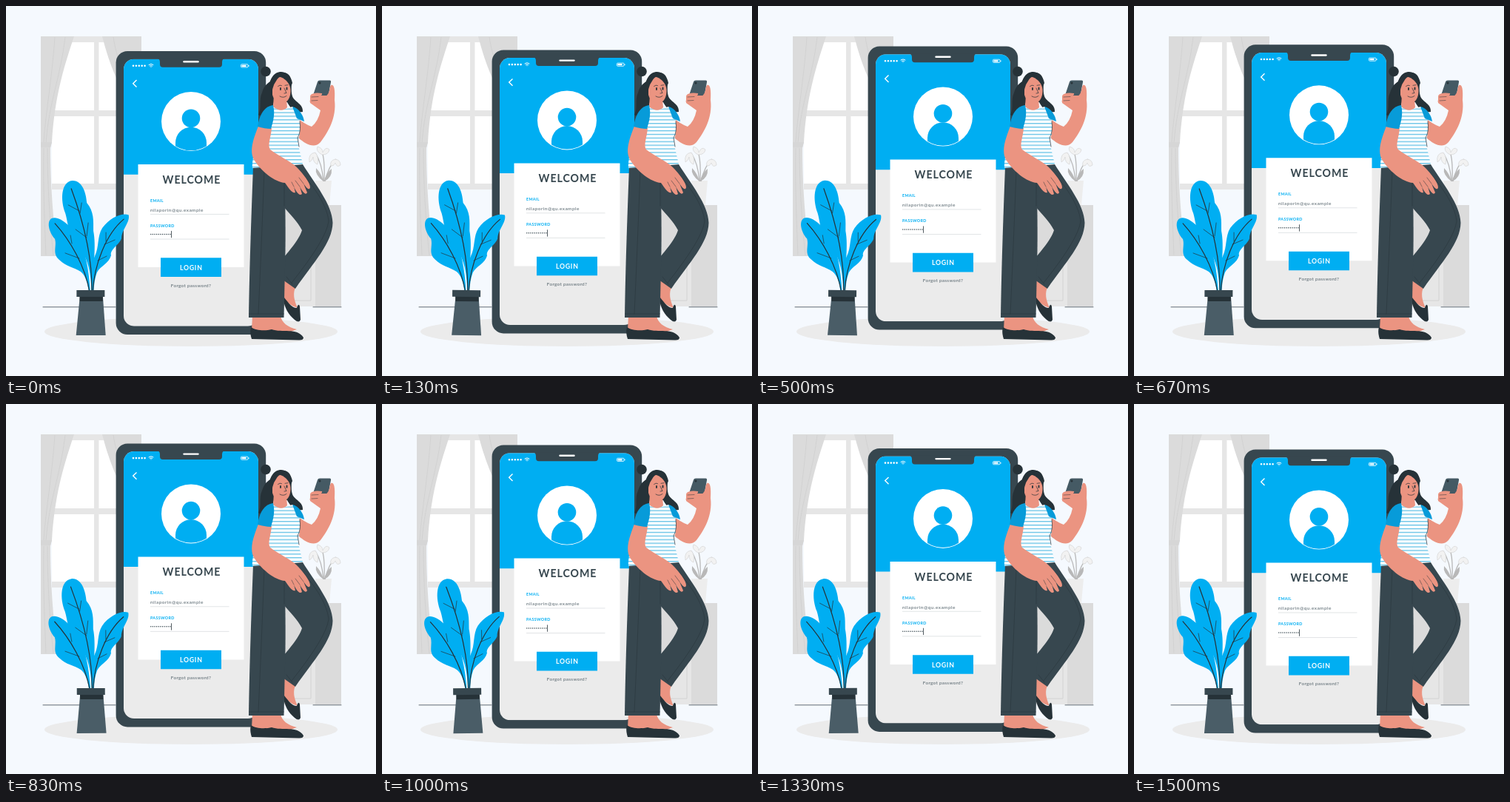
An HTML page for the animation above (1.54 s loop, 500 by 500 pixels).

```html
<!DOCTYPE html>
<html lang="en">
<head>
<meta charset="utf-8">
<title>Login illustration</title>
<style>
  html, body { margin: 0; width: 100%; height: 100%; overflow: hidden; background: #f5f9fe; }
  svg { display: block; width: 100vw; height: 100vh; }
  text { font-family: Lato, sans-serif; fill: #37474f; }
  .mid { text-anchor: middle; }
  .blue { fill: #00aef2; }
  .sleeve { fill: #079bd9; }
  .dark { fill: #37474f; }
  .ink { fill: #263238; }
  .skin { fill: #eb9481; }
  .white { fill: #fff; }
  .line { fill: none; stroke: #263238; stroke-width: .7; stroke-linecap: round; stroke-linejoin: round; }
  .rib { stroke-width: 1.2; }
  .label { font-size: 5.4px; font-weight: 700; fill: #00aef2; letter-spacing: .3px; }
  .small { font-size: 6.5px; fill: #55646c; }
</style>
</head>
<body>
<svg viewBox="0 0 500 500">
  <defs>
    <clipPath id="screen"><rect x="159" y="72" width="182" height="361" rx="14"/></clipPath>
    <clipPath id="avatar"><circle cx="250" cy="156" r="39.5"/></clipPath>
    <pattern id="stripes" width="10" height="4.9" y="143.4" patternUnits="userSpaceOnUse">
      <rect width="10" height="4.9" fill="#fff"/><rect width="10" height="1.3" fill="#5fc0e6"/>
    </pattern>
  </defs>

  <ellipse cx="250" cy="440" rx="198" ry="20" fill="#ebebeb"/>
  <path d="M50 406.800H148M415 406.800H453" class="line"/>

  <g id="window">
    <path d="M62 41H183V248H62Z" fill="#e6e6e6"/>
    <path d="M62 49H119V141H62ZM125.500 49H183V141H125.500ZM62 149H119V240H62ZM125.500 149H183V240H125.500Z" class="white"/>
    <path d="M47 41H92C80 78 66 118 62 184L60 192C60 240 64 300 71 338H47Z" fill="#dbdbdb"/>
    <path d="M130 41H183V150C155 120 140 80 130 41Z" fill="#dbdbdb"/>
    <path d="M80 42C74 95 58 130 54 184M66 42C62 100 54 140 51 184M51 192C50 240 52 290 54 337M56 192C56 240 59 290 64 337M145 42C149 70 160 95 172 110" fill="none" stroke="#d0d0d0" stroke-width=".8"/>
    <path d="M47 184H62L60 191H47Z" fill="#d6d6d6"/>
  </g>

  <g id="cabinet">
    <path d="M345 269H453V406H345Z" fill="#dbdbdb"/>
    <path d="M345 335H418V406H345Z" fill="#e6e6e6"/>
    <path d="M370 345H412V398H370Z" fill="none" stroke="#d2d2d2"/>
    <path d="M418 236H440L437 269H421Z" fill="#ededed"/>
    <path d="M429 237Q427 212 418 199M430 237Q431 212 428 200M431 237Q436 216 446 207" fill="none" stroke="#b9b9b9" stroke-width="1.3"/>
    <path d="M429 237Q417 228 419 219Q426 226 429 237ZM430 237Q441 232 440 220Q432 226 430 237Z" fill="#b8b8b8"/>
    <path d="M418 198Q408 199 410 211Q414 209 415 204Q415 212 421 214Q423 204 418 198ZM427 201Q418 196 421 190Q428 192 428 198Q432 189 437 194Q436 201 427 201ZM445 207Q437 209 439 216Q443 217 445 212Q447 219 452 215Q452 208 445 207Z" fill="#f2f2f2" stroke="#d0d0d0" stroke-width=".6"/>
  </g>

  <g id="phone">
    <rect x="148.600" y="61.300" width="202.600" height="383" rx="15.500" class="dark"/>
    <g clip-path="url(#screen)">
      <path d="M159 72H341V433H159Z" fill="#ebebeb"/>
      <path d="M159 72H341V228H159Z" class="blue"/>
    </g>
    <path d="M203 71Q208 71 208 76V79Q208 83 212 83H288Q292 83 292 79V76Q292 71 297 71Z" class="dark"/>
    <path d="M240.500 75.500H259.500" stroke="#fff" stroke-width="2.400" stroke-linecap="round"/>
    <path d="M172 81H188" stroke="#fff" stroke-width="2.600" stroke-linecap="round" stroke-dasharray="0 3.900"/>
    <path d="M193 79.700Q196 77.400 199 79.700M194.400 81.300Q196 80 197.600 81.300M196 82.700V82.800" fill="none" stroke="#fff" stroke-linecap="round"/>
    <rect x="317.500" y="79" width="9.500" height="4.200" rx="1" fill="none" stroke="#fff" stroke-width=".8"/>
    <path d="M318.500 80H324.500V82.200H318.500ZM327.400 80.300H328.500V82H327.400Z" class="white"/>
    <path d="M176.500 100.300L171.700 105L176.500 109.700" fill="none" stroke="#fff" stroke-width="1.400"/>
    <circle cx="250" cy="156.300" r="40" class="white"/>
    <g class="blue" clip-path="url(#avatar)">
      <circle cx="250" cy="152" r="12.300"/>
      <path d="M229 200V185A21 21 0 0 1 271 185V200Z"/>
    </g>
    <path d="M178.500 214.300H321.500V353.300H178.500Z" class="white"/>
    <text x="251" y="240.200" class="mid" font-size="14.200" font-weight="700" letter-spacing=".95">WELCOME</text>
    <text x="195" y="265.200" class="label">EMAIL</text>
    <text x="195" y="278.200" class="small" letter-spacing=".45">nilaporin@qu.example</text>
    <text x="195" y="299" class="label">PASSWORD</text>
    <path d="M195 281.700H301.500M195 315.300H301.500" stroke="#d5d9db" stroke-width=".7"/>
    <path d="M195.800 308.700H222" stroke="#37474f" stroke-width="1.500" stroke-linecap="round" stroke-dasharray="0 2.600"/>
    <path d="M223.500 304.200V313.500" stroke="#263238" stroke-width=".8"/>
    <path d="M209 340.600H291V366.200H209Z" class="blue"/>
    <text x="250.300" y="357.200" class="mid" font-size="8.800" font-weight="700" letter-spacing=".7" style="fill:#fff">LOGIN</text>
    <text x="250" y="380.200" class="mid small" letter-spacing=".25">Forgot password?</text>
  </g>

  <g id="plant">
    <g class="blue">
      <path d="M112 386C110 372 107 364 101 359C92 353 81 352 72 343C62 335 69 325 66 315C58 306 54 291 62 287C73 283 90 300 98 314C107 330 112 355 114 386Z"/>
      <path d="M115.500 386C115 356 110 340 96 321C83 307 84 293 80 280C73 262 74 238 89 236C103 235 108 253 109 266C119 278 118 290 118 304C122 325 118 348 117 386Z"/>
      <path d="M117 386C115 366 114 350 120 338C126 326 123 311 130 300C140 286 156 279 165.500 282C168 292 156 302 156 314C153 323 140 329 142 337C139 348 128 351 123 360C120 368 119 376 118.500 386Z"/>
    </g>
    <path d="M113 386C107 352 87 317 66 294M116 386C117 340 104 290 88 247M117.500 386C119 350 135 308 159 288" class="line rib"/>
    <path d="M89 321L87 310M99 341L80 334M100 280L102 266M99 277L84 269M109 311L111 293M109 313L94 302M135 318L135 306M133 322L147 316M124 344L136 338" class="line"/>
    <path d="M100 392H131L135 445H95Z" fill="#4a5d67"/>
    <path d="M99.500 391H131V399H100Z" class="ink"/>
    <path d="M95.500 384H133.500V393H95.500Z" class="dark"/>
  </g>

  <g id="woman">
    <path d="M373 366L391 381Q386 391 394 408Q384 406 374 393Z" class="skin"/>
    <path d="M374 392C380 398 386 409 393 408C394 404 396 402 397 406L398 424Q396 429 390 424C382 417 376 409 374 392Z" class="ink"/>
    <path d="M350 216L401 214C417 240 441 268 441.500 293C441 320 416 346 391 382L374 370L366 350C380 335 396 316 400 303C394 291 384 282 374 270Z" class="dark"/>
    <path d="M333 418H371C372 428 381 434 393 437Q370 447 332 438Z" class="skin"/>
    <path d="M331 434C338 439 351 439 359 437C373 442 393 434 402 448Q402 452 395 451.500L332 450Q329 441 331 434Z" class="ink"/>
    <path d="M334 217L376 216C377 250 378 290 377.500 330L375.500 421H328C329 350 332 270 334 217Z" class="dark"/>
    <path d="M329 416H375.500M349 222Q345 330 341 416M376 218V270M387 376L379 366M402 228Q434 266 436 291Q433 315 386 374" class="line" style="stroke-width:.5"/>

    <circle cx="351" cy="88.500" r="6.800" class="ink"/>
    <path d="M357 102C361 90 376 86 383 94C388 101 384 114 387 122C390 130 402 132 401 143C391 145 384 138 380 130H362C358 148 349 151 341 147C346 138 341 128 346 117C349 107 353 105 357 102Z" class="ink"/>
    <path d="M392 150Q404 160 413 163Q422 156 425 141L411 131L411 122L436 119L439 107C443 105 445 111 444 127C447 151 435 171 425 184C417 193 405 187 395 178Z" class="skin"/>
    <path d="M360 136Q371 143 387 136L396 143Q398 160 397 173Q394 182 395 188L401 214L333 219C332 200 345 160 360 136Z" fill="url(#stripes)"/>
    <path d="M387 136C396 138 402 148 403 156L393 152Z" class="sleeve"/>
    <path d="M397 156Q399 170 394 178L396 190" class="line"/>
    <path d="M362 120L379 126L380 137Q372 145 361 136Z" class="skin"/>
    <path d="M360 110C361 102 365 96 371 96C379 99 384 106 384.500 113C385 123 381 131 373 131C367 131 362 127 360 120Z" class="skin"/>
    <path d="M371 94C377 96 382 100 384.500 110L387 104Q384 90 372 89C361 89 357 99 355 110L359 120Q360 104 371 94Z" class="ink"/>
    <path d="M367.500 108.500Q370 106 372.500 107.500M377 107.300L381 106.700M376 111L379 117.500L376 118M370 122Q375 125 379 121.500" class="line"/>
    <path d="M371 110.800V113M379.500 110.500V112.700" stroke="#263238" stroke-width="1.800" stroke-linecap="round"/>

    <path d="M421 102.500Q421.500 100.500 424 100.500H437.500Q439.500 100.500 439 103L436 119Q435.500 121 433 121H417Q415 121 415.500 119Z" fill="#455a64"/>
    <circle cx="424" cy="104" r="1.500" class="ink"/>
    <path d="M411 122C412 117 422 117 427 118C428 121 423 122 420 123L428 124C428 128 420 128 417 128L425 130C424 134 414 133 411 130C409 127 415 125 411 122ZM430 124Q437 120 438 109C442 104 445 114 443 129Z" class="skin"/>
    <path d="M413 123L422 122.500M413 128L421 127.500" class="line" style="stroke-width:.5"/>

    <path d="M341 162L359 165C358 178 353 188 357 194C369 203 383 209 392 217C402 227 411 239 411 245C410 250 406 246 402 240L407 252C405 257 400 250 397 244L400 254C396 258 391 249 389 244L391 252C387 254 382 246 377 239C363 238 345 223 336 209C327 196 336 176 341 162Z" class="skin"/>
    <path d="M402 240L396 232M397 244L391 236M389 244L386 238" class="line" style="stroke-width:.5"/>
    <path d="M340 163C342 150 347 136 361 134C364 146 361 156 358 166Q350 166 340 163Z" class="sleeve"/>
  </g>
</svg>
<script>
  const LOOP = 1540, STEPS = 37;
  const phone = document.getElementById('phone');
  const plant = document.getElementById('plant');

  // Triangle wave: 0 at p = 0, 1 at p = 0.5
  const triangle = p => 1 - Math.abs(1 - 2 * (((p % 1) + 1) % 1));

  function draw(now) {
    const step = Math.floor((now % LOOP) / LOOP * STEPS + 0.05);
    const phase = step / STEPS + 60 / LOOP;
    const lift = 0.5 - 10 * triangle(phase);
    const sway = 2 * triangle(phase + 0.25) - 1;
    phone.setAttribute('transform', `translate(0 ${lift})`);
    plant.setAttribute('transform', `rotate(${sway} 112 340)`);
    requestAnimationFrame(draw);
  }
  draw(0);
</script>
</body>
</html>
```
